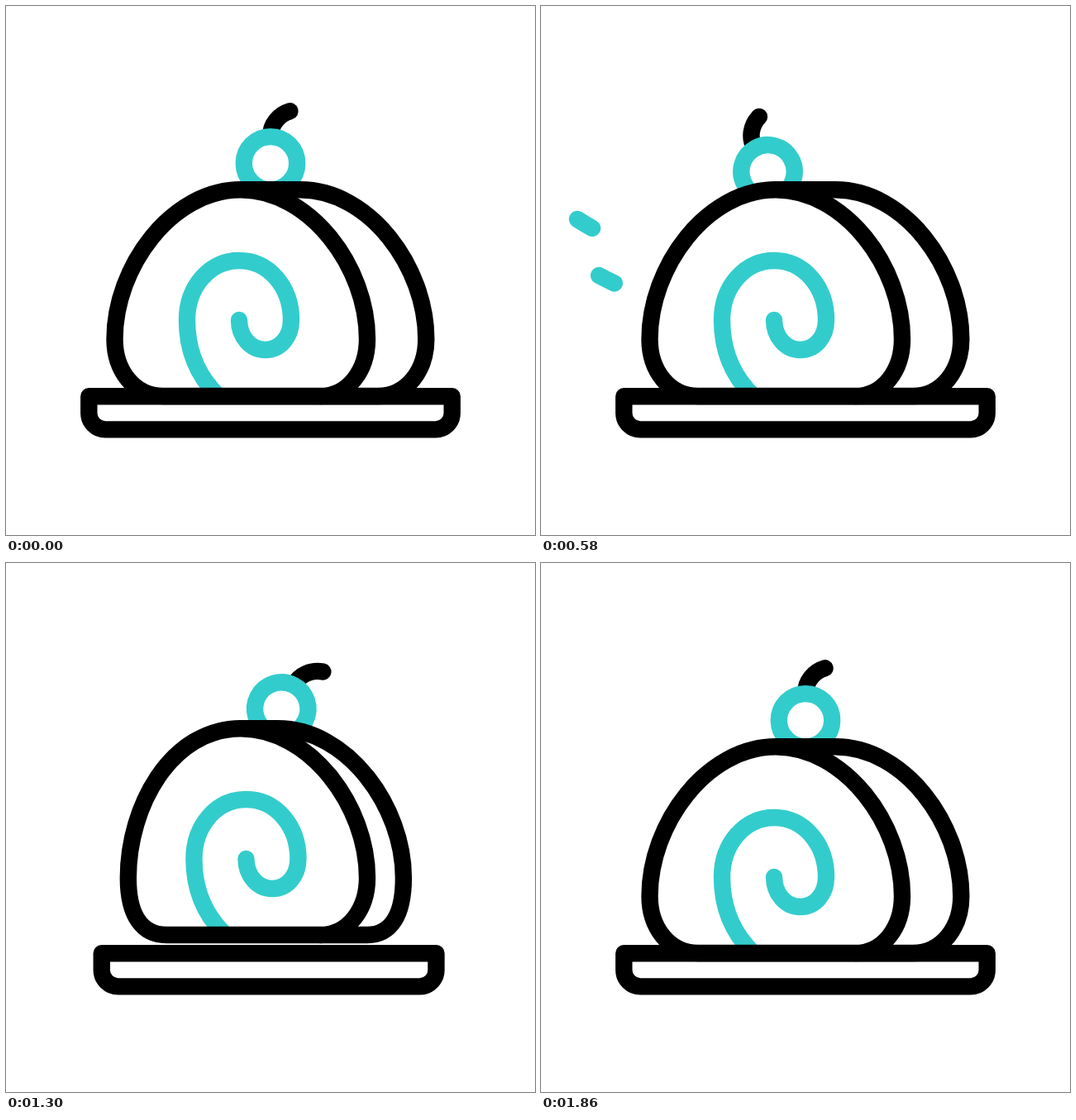
These frames come from a looping animation (640 by 640 pixels, 2.1 s). An HTML page:

```html
<!DOCTYPE html>
<html lang="en">
<head>
<meta charset="utf-8">
<title>Roll cake</title>
<style>
  html, body { margin: 0; width: 100%; height: 100%; overflow: hidden; background: #fff; }
  svg { display: block; width: 100%; height: 100%; }
  path, circle { fill: none; stroke: #000; stroke-width: 20.4; stroke-linecap: round; stroke-linejoin: round; }
  .teal { stroke: #33cccc; }
  .white { fill: #fff; }
</style>
</head>
<body>
<svg viewBox="0 0 640 640">
  <path id="burstA" class="teal" d="M126 444.4H46"/>
  <path id="burstB" class="teal" d="M125 452L89 380"/>
  <g id="cherry">
    <path d="M0 -33C0 -47 10 -59 23.5 -63"/>
    <circle class="teal" r="32.2"/>
  </g>
  <g id="cake">
    <path id="back" class="white"/>
    <path id="face" class="white" style="stroke:none"/>
    <path id="swirl" class="teal" d="M282 380C282 400 296 416 313.5 416C332 416 345 400 345 380C345 340 318 308 282 308C246 308 219 340 219 380C219 415 231 446 255 470"/>
    <path id="front"/>
  </g>
  <path id="plate"/>
  <path id="windA" class="teal" d="M44 258C130 312 210 326 290 327C370 328 440 320 500 300"/>
  <path id="windB" class="teal" d="M70 326C150 368 230 385 320 379C390 375 450 365 510 345"/>
</svg>
<script>
const LOOP = 2100, STEP = 20;
const el = id => document.getElementById(id);

// Smooth curve through [time, value] keys, flat at peaks and at both ends.
function track(...keys) {
  const last = keys.length - 1;
  const rate = i => (keys[i + 1][1] - keys[i][1]) / (keys[i + 1][0] - keys[i][0]);
  const slope = keys.map((_, i) => {
    if (i === 0 || i === last) return 0;
    const a = rate(i - 1), b = rate(i);
    return a * b > 0 ? 2 * a * b / (a + b) : 0;
  });
  return t => {
    if (t <= keys[0][0]) return keys[0][1];
    if (t >= keys[last][0]) return keys[last][1];
    const i = keys.findIndex(k => k[0] > t) - 1;
    const [t0, v0] = keys[i], [t1, v1] = keys[i + 1];
    const d = t1 - t0, u = (t - t0) / d, w = 1 - u;
    return w * w * ((1 + 2 * u) * v0 + u * d * slope[i])
         + u * u * ((1 + 2 * w) * v1 - w * d * slope[i + 1]);
  };
}

const dip = [[0, 0], [400, 52.5], [540, 16], [580, 0]];
const settle = [[1600, 19], [1860, 0]];

const cakeY = track(...dip, [800, -44.5], [850, -45.5], [1120, -38], [1300, -22], [1460, -0.5], ...settle);
const plateY = track(...dip, [700, -18], [800, -13], [980, 0], [1460, 0], ...settle);
const squeeze = track([580, 0], [1100, 1], [1550, 0]);

// Cherry: sideways shift, height relative to the cake, turn.
const cherryX = track([0, 0], [400, -32.5], [580, -45.5], [800, -33.5], [1120, -3], [1460, 21], [1860, 0]);
const cherryY = track([0, 0], [400, 8.5], [580, 10], [800, -14.5], [970, -53], [1120, -31], [1220, 1], [1460, 15], [1860, 0]);
const cherryTurn = track([0, 0], [400, -23.5], [580, -29.5], [800, -13.5], [1120, 6.4], [1460, 40], [1860, 0]);

const windHead = track([560, 0], [580, 21], [800, 262], [1000, 500]);
const windTail = track([580, 0], [800, 69], [1040, 500]);
const burstHead = track([1360, 0], [1460, 72], [1540, 80]);
const burstTail = track([1390, 0], [1460, 40], [1680, 80]);

function trim(id, tail, head) {
  const p = el(id), end = Math.min(head, p.getTotalLength());
  const len = end - tail;
  p.style.display = len > 1 ? "" : "none";
  p.style.strokeDasharray = `${Math.max(len, 1)} 2000`;
  p.style.strokeDashoffset = -tail;
}

function drawCake(m) {
  const left = 131.5 + 28 * m, shift = -47 * m;
  const top = 284 + 72 + shift, right = 508.3 + shift;
  const low = 441 + 13 * m;
  const front = `M284 222.3C200 222.3 ${left} 316 ${left} 403C${left} ${low} ${155 + 17 * m} 472 ${190 + 7 * m} 472`
    + `H380C414 472 437 441 437 403C437 316 368 222.3 284 222.3Z`;
  const back = `M284 222.3H${top}C${top + 84} 222.3 ${right} 316 ${right} 403`
    + `C${right} ${low} ${485 - 34 * m} 472 ${450 - 22 * m} 472H380`;
  el("front").setAttribute("d", front);
  el("face").setAttribute("d", front);
  el("back").setAttribute("d", back);
  el("swirl").setAttribute("transform", `translate(${14.5 * m} 0)`);
}

function drawPlate(m, y) {
  const l = 100.3 + 26.5 * m, r = 539.7 - 33 * m;
  el("plate").setAttribute("d", `M${l} 472.3H${r}V492.4A20 20 0 0 1 ${r - 20} 512.4H${l + 20}A20 20 0 0 1 ${l} 492.4Z`);
  el("plate").setAttribute("transform", `translate(0 ${y})`);
}

function draw(t) {
  const m = squeeze(t), y = cakeY(t);
  drawCake(m);
  el("cake").setAttribute("transform", `translate(0 ${y})`);
  drawPlate(m, plateY(t));
  el("cherry").setAttribute("transform",
    `translate(${320 + cherryX(t)} ${190.3 + y + cherryY(t)}) rotate(${cherryTurn(t)})`);
  for (const id of ["windA", "windB"]) trim(id, windTail(t), windHead(t));
  for (const id of ["burstA", "burstB"]) trim(id, burstTail(t), burstHead(t));
}

const start = performance.now();
function tick() {
  const t = (performance.now() - start) % LOOP;
  draw(Math.floor(t / STEP) * STEP);
  requestAnimationFrame(tick);
}
tick();
</script>
</body>
</html>
```
